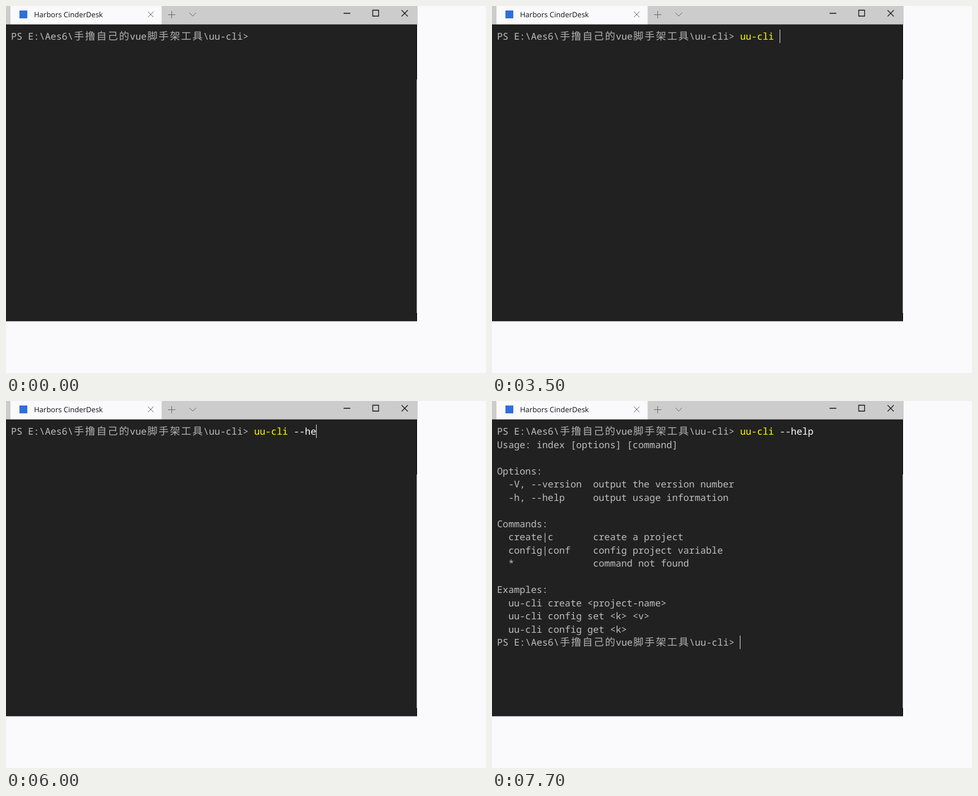
These frames come from a looping animation (856 by 654 pixels, 8000 ms). An HTML page:

```html
<!DOCTYPE html>
<html lang="zh">
<head>
<meta charset="utf-8">
<title>Terminal</title>
<style>
  html, body { margin: 0; width: 100%; height: 100%; overflow: hidden; background: #fafafc; }
  svg { display: block; }
  text { white-space: pre; text-rendering: geometricPrecision; }
  .mono { font: 16.8px "Noto Sans Mono", monospace; fill: #bebebe; }
  .han { font: 300 18.2px "Noto Sans CJK SC", "Noto Sans CJK", sans-serif; letter-spacing: 1.96px; fill: #b0b0b0; }
  .command { fill: #ff0; }
  .option { fill: #fff; }
  .title { font: 13px "Open Sans", sans-serif; fill: #111; }
  .icon { fill: none; stroke: #666; stroke-width: 1; }
  .button { fill: none; stroke: #111; stroke-width: 1.3; }
</style>
</head>
<body>
<svg width="856" height="654" viewBox="0 0 856 654">
  <rect width="734" height="33" fill="#ccc"/>
  <rect x="8" width="269.5" height="33" fill="#fafafd"/>
  <rect x="24" y="8" width="14" height="14" fill="#2f6fd8"/>
  <text class="title" x="50" y="20">Harbors CinderDesk</text>
  <path class="icon" d="M253 10l10 10m0-10l-10 10M289 15.5h13M295.5 9v13M327 12l6 6 6-6"/>
  <path class="button" d="M602 13h12M654 7.5h10.5v10.5h-10.5zM705.5 7.5l11 11m0-11l-11 11"/>
  <rect y="32.8" width="733" height="529" fill="#212121"/>
  <path d="M732 33h1v98h-1zM732 547h1v14h-1z" fill="#000"/>
  <rect x="732" y="131" width="1" height="416" fill="#858585"/>
  <g id="screen"></g>
  <rect id="caret" width="1" height="24" fill="#e4e4e4"/>
</svg>
<script>
const LEFT = 9, TOP = 42, CELL = 10.08, ROW = 23.5;
const LOOP = 8000, KEY_GAP = 200;
const PROMPT_COLS = 43, COMMAND_LENGTH = 6;
const HELP = `Usage: index [options] [command]

Options:
  -V, --version  output the version number
  -h, --help     output usage information

Commands:
  create|c       create a project
  config|conf    config project variable
  *              command not found

Examples:
  uu-cli create <project-name>
  uu-cli config set <k> <v>
  uu-cli config get <k>`.split('\n');
const LAST_ROW = HELP.length + 1;

// Keys are typed in bursts at an even pace.
const BURSTS = [
  ['uu', 1500], ['-cli', 2300], [' ', 3500],
  ['--', 5200], ['h', 5700], ['elp', 6000]
];
const KEYS = BURSTS.flatMap(([text, from]) =>
  [...text].map((char, i) => ({ char, at: from + i * KEY_GAP })));
const ENTER = 6700, PRINT = 6800, READY = 6900;

// The caret flips at each blink; any key or output shows it again.
const BLINKS = [0, 600, 1200, 2200, 3900, 4400, 5000, 7100, 7700];
const WAKES = [...KEYS.map(key => key.at), ENTER, PRINT, READY];

const screen = document.getElementById('screen');
const caret = document.getElementById('caret');

function svg(name, attrs, parent) {
  const el = document.createElementNS('http://www.w3.org/2000/svg', name);
  for (const key in attrs) el.setAttribute(key, attrs[key]);
  return parent.appendChild(el);
}

const rowTop = row => Math.round(TOP + row * ROW);

function write(parent, col, row, string, type = 'mono') {
  const inset = type === 'han' ? 1 : 0;
  const el = svg('text', {
    class: type, x: LEFT + col * CELL + inset, y: rowTop(row) + 18
  }, parent);
  el.textContent = string;
  return el;
}

function prompt(row) {
  const group = svg('g', {}, screen);
  write(group, 0, row, 'PS E:\\Aes6\\');
  write(group, 11, row, '手撸自己的', 'han');
  write(group, 21, row, 'vue');
  write(group, 24, row, '脚手架工具', 'han');
  write(group, 34, row, '\\uu-cli>');
  return group;
}

prompt(0);
const command = write(screen, PROMPT_COLS, 0, '', 'mono command');
const option = write(screen, PROMPT_COLS + COMMAND_LENGTH, 0, '', 'mono option');
const help = svg('g', {}, screen);
HELP.forEach((line, i) => write(help, 0, i + 1, line));
const nextPrompt = prompt(LAST_ROW);

function show(el, on) {
  el.style.visibility = on ? 'visible' : 'hidden';
}

function caretOn(time) {
  const wake = Math.max(-1, ...WAKES.filter(at => at <= time));
  const flips = BLINKS.filter(at => at > wake && at <= time).length;
  return flips % 2 === 0;
}

function caretCell(time, typed) {
  if (time < ENTER) return [PROMPT_COLS + typed, 0];
  if (time < PRINT) return [0, 1];
  return [time < READY ? 0 : PROMPT_COLS, LAST_ROW];
}

function draw(time) {
  const typed = KEYS.filter(key => key.at <= time).map(key => key.char).join('');
  command.textContent = typed.slice(0, COMMAND_LENGTH);
  option.textContent = typed.slice(COMMAND_LENGTH);
  show(help, time >= PRINT);
  show(nextPrompt, time >= READY);
  show(caret, caretOn(time));
  const [col, row] = caretCell(time, typed.length);
  caret.setAttribute('x', Math.round(LEFT + col * CELL));
  caret.setAttribute('y', rowTop(row));
}

const start = performance.now();
function tick() {
  draw((performance.now() - start) % LOOP);
  requestAnimationFrame(tick);
}
tick();
</script>
</body>
</html>
```
